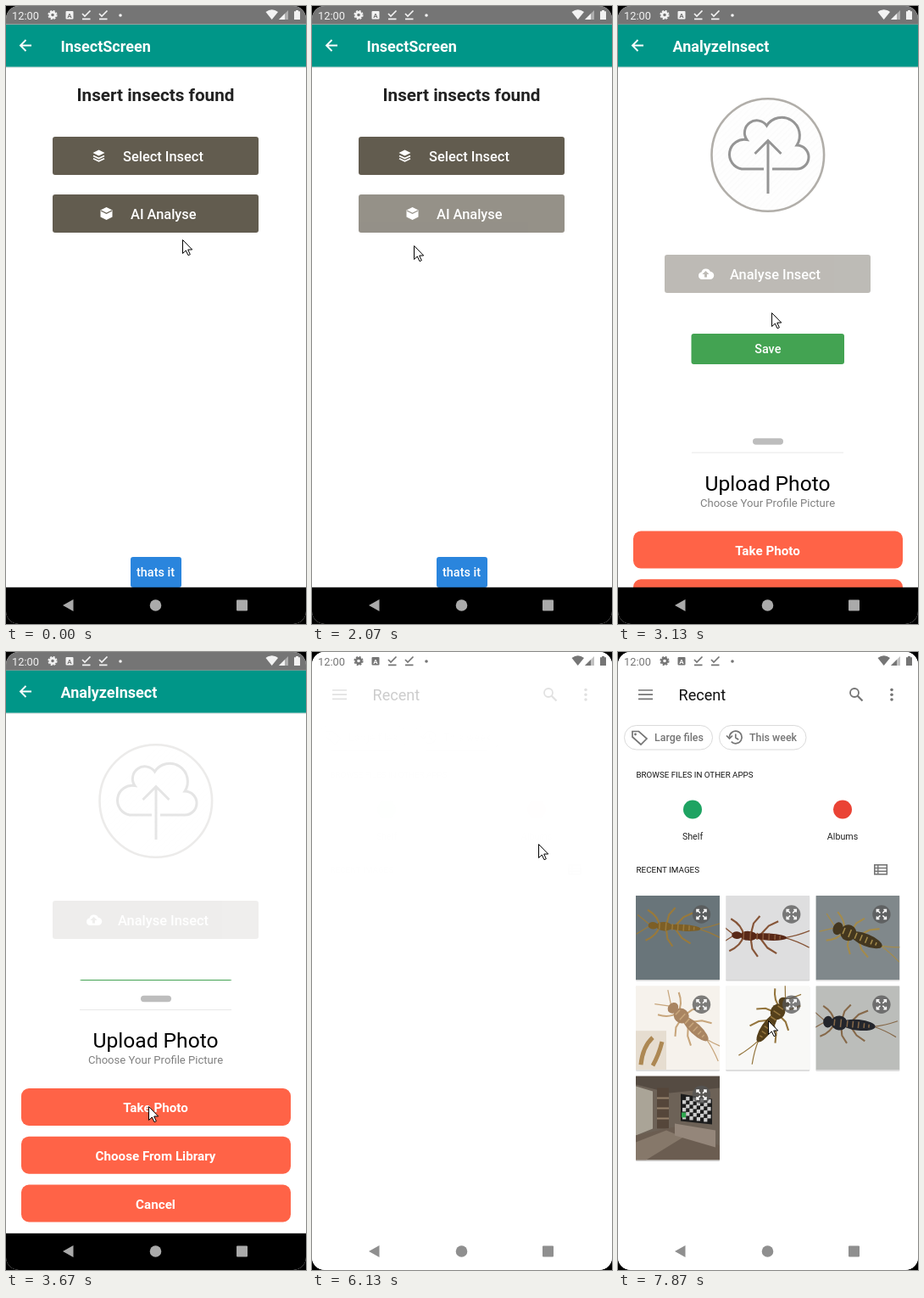
Animation of 354x728 px, one loop 8 s. Source, as an HTML page:

```html
<!DOCTYPE html>
<html lang="en">
<head>
<meta charset="utf-8">
<title>Insect app</title>
<style>
  html, body { margin: 0; width: 354px; height: 728px; overflow: hidden; background: #000; }
  #stage { display: block; background: #fff; border-radius: 15px; font-family: Roboto, sans-serif; }
</style>
</head>
<body>
<svg id="stage" width="354" height="728" viewBox="0 0 354 728"></svg>
<script>
const text = (x, y, size, weight, fill, label, anchor = "start") =>
  `<text x="${x}" y="${y}" font-size="${size}" font-weight="${weight}" fill="${fill}" text-anchor="${anchor}">${label}</text>`;
const rect = (x, y, w, h, fill, r = 0, extra = "") =>
  `<rect x="${x}" y="${y}" width="${w}" height="${h}" rx="${r}" fill="${fill}" ${extra}/>`;
const dot = (x, y, r, fill) => `<circle cx="${x}" cy="${y}" r="${r}" fill="${fill}"/>`;
const fillPath = (d, fill) => `<path d="${d}" fill="${fill}"/>`;
const line = (d, stroke, width = 2) => `<path d="${d}" fill="none" stroke="${stroke}" stroke-width="${width}"/>`;
const group = (id, body, extra = "") => `<g id="${id}" ${extra}>${body}</g>`;

// System bars
const statusBar = (bg, ink) => rect(0, 0, 354, 21.6, bg) +
  text(7, 15.5, 12.8, 400, ink, "12:00") +
  `<circle cx="55" cy="10.5" r="3.1" fill="none" stroke="${ink}" stroke-width="2.6"/>
   <circle cx="55" cy="10.5" r="4.8" fill="none" stroke="${ink}" stroke-width="1.6" stroke-dasharray="2.2 1.57"/>` +
  rect(70.5, 6, 9, 9.5, ink, 1) + text(75, 13.7, 8, 700, bg, "A", "middle") +
  [90, 110].map(x => line(`M${x} 9l3 3 6.5-6.5M${x} 15.3h9.5`, ink, 1.7)).join("") +
  dot(135, 11, 1.8, ink) +
  fillPath("M313.7 16L306.5 7Q313.7 1.5 321 7Z", ink) +
  `<path d="M333 5V16H322Z" fill="${ink}" opacity=".45"/>` + fillPath("M329 9V16H322Z", ink) +
  fillPath("M340 6.2h2v-1.2h3v1.2h2V16h-7Z", ink);
const navBar = (bg, ink) => rect(0, 684.8, 354, 43.2, bg) +
  fillPath("M67 706L79.500 699V713Z", ink) + dot(176.500, 706, 6.8, ink) + rect(272, 699.5, 13, 13, ink, 1);

// App screens
const brown = "#625c4f", tomato = "#ff6347", gray = "#757575";
const page = (title, body) => rect(0, 21.6, 354, 663.4, "#fff") + body +
  rect(0, 71, 354, 2, "#dfe5e5") + rect(0, 21.6, 354, 50, "#009688") +
  line("M30 46.500H17M23.500 40l-6.500 6.500 6.500 6.500", "#fff", 1.9) + text(64.5, 54, 18, 700, "#fff", title);
const button = (y, x, label, icon) => rect(55, y, 243, 45, brown, 3) + text(x, y + 28.7, 16.4, 500, "#fff", label) + icon;

const layers = fillPath("M109.500 169.500l7 3.500-7 3.500-7-3.500Z", "#fff") +
  line("M103 176.500l6.500 3 6.500-3M103 179.800l6.500 3 6.500-3", "#fff", 1.7);
const cube = fillPath("M118.500 237l7 3.500v8l-7 3.500-7-3.500v-8Z", "#fff") + line("M112 241l6.500 3.300 6.500-3.300", brown, 1.1);
const cloudIcon = fillPath("M99 322a4.300 4.300 0 0 1-.5-8.500a5.500 5.500 0 0 1 10.300-.7a4.600 4.600 0 0 1-.3 9.200Z", "#fff") +
  fillPath("M103.500 312l4 4h-2.500v3.500h-3v-3.500h-2.500Z", brown);

const homePage = page("InsectScreen",
  text(176.5, 112, 20.67, 700, "#222", "Insert insects found", "middle") +
  button(154, 138, "Select Insect", layers) +
  group("analyse", button(222, 147, "AI Analyse", cube)) +
  rect(147, 649, 60, 36, "#2a85dd", 3) + text(176.5, 672, 14.4, 500, "#fff", "thats it", "middle"));

const upload = `<circle cx="176.800" cy="175.500" r="66.300" fill="url(#hatch)" stroke="#443d31" stroke-width="2.600"/>` +
  line("M172 192H146A17.500 17.500 0 0 1 152 157.500A14 14 0 0 1 175.500 141A20 20 0 0 1 211 164A14 14 0 0 1 211 192H182", "#000", 3) +
  line("M177 221V158M161.500 174L177 158.500L192.500 174", "#000", 3);
const sheetButton = (y, label) => rect(18, y, 318, 44, tomato, 9) + text(176.5, y + 28, 15.2, 700, "#fff", label, "middle");
const sheet = rect(0, 387, 354, 298, "#fff") + rect(159, 404.700, 36, 7.5, "#bdbdbd", 3.7) +
  rect(87, 421, 179, 1, "#e8e8e8") +
  text(176.5, 466, 24.6, 400, "#000", "Upload Photo", "middle") +
  text(176.5, 485, 13.1, 400, "#808080", "Choose Your Profile Picture", "middle") +
  sheetButton(514, "Take Photo") +
  group("library", sheetButton(570.7, "Choose From Library")) + sheetButton(627.5, "Cancel");
const analysePage = page("AnalyzeInsect",
  group("dimmed", upload + button(293, 132, "Analyse Insect", cloudIcon)) +
  rect(86.5, 386, 180.5, 36, "#43a352", 3) + text(176.8, 409.3, 14.4, 500, "#fff", "Save", "middle") +
  group("sheet", sheet));

// Picker thumbnails
const bug = (x, y, turn, scale, girth, body, legs) => {
  const side = line("M-18 0Q-20-12-34-19M-10 0L-7-15L0-24M0 0L11-13L22-19", legs, 2.2) +
    line("M31 0Q45-3 60-10M-29 0Q-36-5-46-12", legs, 1.3);
  const part = (cx, rx, ry) => `<ellipse cx="${cx}" rx="${rx}" ry="${ry}" fill="${body}"/>`;
  return `<g transform="translate(${x} ${y}) rotate(${turn}) scale(${scale})">${side}<g transform="scale(1 -1)">${side}</g>` +
    part(-26, 6, girth * .8) + part(-12, 10, girth) + part(12, 21, girth * .75) +
    line("M-18-4v8M-10-5v10M-2-4v8M5-4v8M12-4v8M19-3v6M25-2v4", legs, 1.6) + "</g>";
};
let room = rect(0, 0, 99, 99, "#6d6257") + fillPath("M0 0H99V14L40 20L0 10Z", "#554b42") +
  fillPath("M0 12L20 18V62L0 70Z", "#aaa497") + rect(25, 14, 14, 48, "#55463a") +
  line("M25 26h14M25 38h14M25 50h14", "#94806a", 2) +
  fillPath("M0 70L45 60L99 82V99H0Z", "#6b5d51") + fillPath("M0 78L36 64L56 72L12 99H0Z", "#86786a") +
  fillPath("M46 56L94 64V84L46 70Z", "#94867a") + fillPath("M53 21L90 27V57L53 53Z", "#1c1c1c");
for (let i = 0; i < 48; i++) {
  const col = i % 8, row = i / 8 | 0;
  if ((col + row) % 2) room += rect(55 + col * 4.2, 24 + row * 4.5 + col * .5, 4.2, 4.5, "#ccc");
}
room += rect(54, 43, 5, 6, "#2fa84f");
const pictures = [
  rect(0, 0, 99, 99, "#69757a") + bug(45, 37, 4, .95, 5.5, "#7d5f26", "#9a7a3a"),
  rect(0, 0, 99, 99, "#dededf") + bug(39, 48, 3, 1, 5.5, "#582817", "#865538"),
  rect(0, 0, 99, 99, "#80888b") + bug(49, 48, 22, .95, 10, "#44371f", "#a48b4b"),
  rect(0, 0, 99, 99, "#f6f2ec") + bug(62, 43, 43, .95, 9, "#a98562", "#c8a67c") +
    rect(0, 53, 36, 46, "#e6ddd0") + line("M6 93Q8 72 20 61M20 94Q27 82 31 66", "#ad8853", 5),
  rect(0, 0, 99, 99, "#f8f8f6") + bug(55, 40, 124, .95, 9, "#55401b", "#94753d"),
  rect(0, 0, 99, 99, "#bbbdba") + bug(39, 45, 6, .95, 9, "#24262c", "#86694a"),
  room
];
const placeholder = rect(36.5, 36.5, 26, 26, "none", 2, 'stroke="#f4574a" stroke-width="2.500"') +
  fillPath("M40.500 58l5-6 4 4 5-7 5 9Z", "#f4574a");
const expand = `<circle cx="77.500" cy="22" r="10.700" fill="#555" opacity=".75"/>` +
  line("M72 19.500v-3h3M80 16.500h3v3M72 24.500v3h3M80 27.500h3v-3M72.500 17l3.500 3.500M82.500 17l-3.500 3.500M72.500 27l3.500-3.500M82.500 27l-3.500-3.500", "#fff", 1.5);
const grid = pictures.map((picture, i) => {
  const x = 21 + i % 3 * 106.200, y = 287 + (i / 3 | 0) * 106.200;
  return rect(x, y + 1, 99, 99.500, "#d4d4d4", 1) + rect(x, y, 99, 99, "#fafafa") +
    `<svg x="${x}" y="${y}" width="99" height="99"><g class="picture">${picture}</g><g class="placeholder">${placeholder}</g>${expand}</svg>`;
}).join("");

const chip = (x, w, label) => rect(x, 86.5, w, 28.5, "#fff", 14.2, 'stroke="#dadada"') + text(x + 35.5, 105, 12.4, 500, gray, label);
const toolbar = line("M24 45h17M24 50.200h17M24 55.400h17", gray, 1.7) + text(71.5, 57, 18.1, 400, "#111", "Recent") +
  `<circle cx="279" cy="48" r="5" fill="none" stroke="${gray}" stroke-width="1.800"/>` + line("M282.500 51.500l6 6", gray, 2.2) +
  [44.5, 50.2, 56].map(y => dot(323, y, 1.8, gray)).join("");
const shortcuts = chip(7.5, 104, "Large files") + chip(119.5, 102.5, "This week") +
  line("M17 93.500h7.500l9.500 8.500-7 7-10-9Z", gray, 1.7) + dot(20.5, 97, 1.4, gray) +
  line("M131.500 100.500a7.300 7.300 0 1 1 2.200 5.200M128 98.500l3.500 3.500 3.500-3.500M138.800 96.500v4.500l3.500 2.200", gray, 1.7) +
  text(21.5, 147.7, 9.75, 400, "#111", "BROWSE FILES IN OTHER APPS") +
  dot(88, 185.5, 11, "#1ea362") + text(88, 220.500, 10.7, 400, "#222", "Shelf", "middle") +
  dot(265, 185.5, 11, "#ea4335") + text(265, 220.500, 10.7, 400, "#222", "Albums", "middle") +
  text(21.5, 260, 9.85, 400, "#111", "RECENT IMAGES") +
  rect(302.800, 250.800, 14.500, 11, "none", 0, `stroke="${gray}" stroke-width="1.600"`) +
  line("M303 254.500h14M303 258.200h14M306.800 251v11", gray, 1.4);

const stage = document.getElementById("stage");
stage.innerHTML = `<defs><pattern id="hatch" width="5" height="5" patternUnits="userSpaceOnUse" patternTransform="rotate(45)">
  ${rect(0, 0, 5, 5, "#fcfcfc") + rect(0, 0, 1.2, 5, "#f5f5f5")}</pattern>
  <clipPath id="content">${rect(0, 21.6, 354, 663.4, "#fff")}</clipPath></defs>` +
  `<g clip-path="url(#content)">${group("home", homePage) + group("detail", analysePage)}</g>` +
  statusBar("#757575", "#f2f2f2") + navBar("#000", "#aaa") +
  group("picker", rect(0, 0, 354, 728, "#fff") + statusBar("#fff", gray) + navBar("#fff", "#8f8f8f") +
    group("toolbar", toolbar) + group("shortcuts", shortcuts) + group("grid", grid)) +
  group("cursor", `<path d="M.5.5V16.500L4.300 13L7 18.700L9.300 17.700L6.700 12H11.700Z" fill="#fff" stroke="#000"/>`);

// Motion
const $ = id => document.getElementById(id);
const pictureLayers = [...stage.querySelectorAll(".picture")];
const placeholderLayers = [...stage.querySelectorAll(".placeholder")];
const progress = (t, from, to) => Math.min(1, Math.max(0, (t - from) / (to - from)));
const easeOut = p => 1 - (1 - p) ** 3;
const smooth = p => p * p * (3 - 2 * p);
const fade = (el, value) => {
  el.setAttribute("opacity", value);
  el.setAttribute("visibility", value ? "visible" : "hidden");
};
const zoom = (id, s) => $(id).setAttribute("transform", `translate(177 353) scale(${s}) translate(-177 -353)`);

const cursorPath = [ // time, x, y
  [0, 208, 275], [200, 206, 222], [440, 206, 222], [670, 202, 234], [950, 202, 234], [1350, 165, 205],
  [1650, 122, 240], [1820, 122, 246], [2070, 120, 282], [2470, 185, 285], [2670, 186, 306], [2950, 185, 312],
  [3530, 168, 524], [3670, 168, 535], [4050, 150, 585], [4550, 150, 585], [5200, 265, 245], [5470, 267, 226],
  [6130, 267, 226], [6730, 254, 255], [6930, 306, 329], [7300, 306, 329], [7870, 177, 434], [8000, 177, 434]
];

function draw(t) {
  const i = cursorPath.findIndex(p => p[0] > t);
  const [t0, x0, y0] = cursorPath[i - 1], [t1, x1, y1] = cursorPath[i];
  const p = smooth(progress(t, t0, t1));
  $("cursor").setAttribute("transform", `translate(${x0 + (x1 - x0) * p} ${y0 + (y1 - y0) * p})`);

  fade($("analyse"), 1 - .325 * progress(t, 1680, 1800));
  const enter = easeOut(progress(t, 2100, 2460));
  zoom("home", 1 + .15 * enter);
  zoom("detail", .85 + .15 * enter);
  fade($("detail"), enter);

  const rise = easeOut(progress(t, 2900, 3680));
  $("sheet").setAttribute("transform", `translate(0 ${300 * (1 - rise)})`);
  fade($("dimmed"), 1 - .9 * rise);
  fade($("library"), 1 - .8 * progress(t, 4050, 4200));

  const open = easeOut(progress(t, 5230, 5470));
  $("picker").setAttribute("transform", `translate(0 ${50 * (1 - open)})`);
  fade($("picker"), open);
  fade($("toolbar"), progress(t, 6100, 6250));
  fade($("shortcuts"), progress(t, 6130, 6400));
  fade($("grid"), progress(t, 6300, 6450));
  const loaded = progress(t, 6430, 7130);
  pictureLayers.forEach(el => fade(el, loaded));
  placeholderLayers.forEach(el => fade(el, Math.min(1, 1.4 * (1 - loaded))));
}

function tick() {
  draw(performance.now() % 8000);
  requestAnimationFrame(tick);
}
tick();
</script>
</body>
</html>
```
